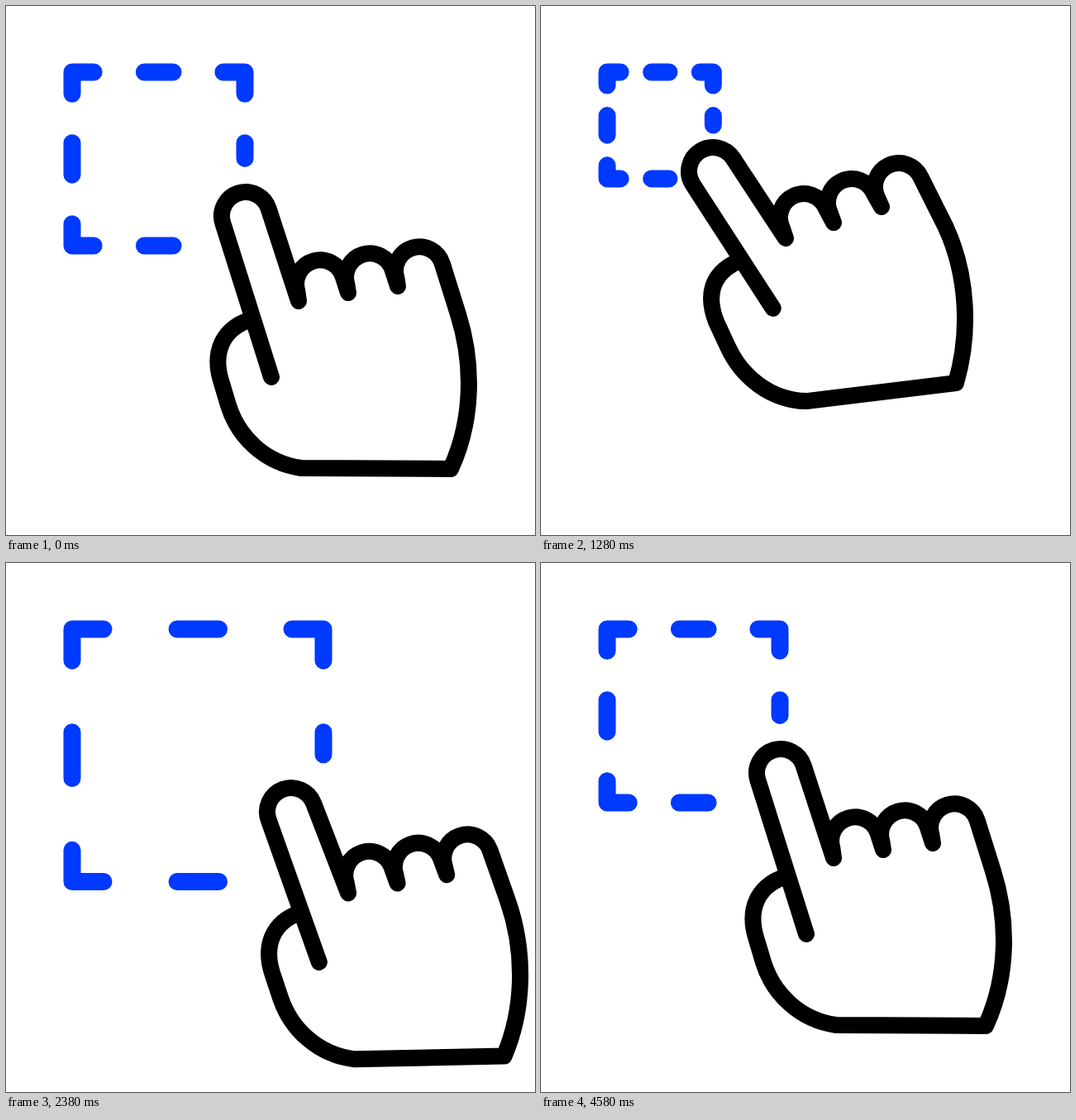
Write an HTML page that moves like this. It is 640 px wide and 640 px high and loops after 4680 ms.

```html
<!DOCTYPE html>
<html lang="en">
<head>
<meta charset="utf-8">
<title>Drag to resize</title>
<style>
  html, body { margin: 0; width: 100%; height: 100%; overflow: hidden; background: #fff; }
  svg { display: block; width: 100%; height: 100%; }
  path { fill: none; stroke-linecap: round; stroke-linejoin: round; }
  #box { stroke: #0039ff; stroke-width: 21; }
  #hand { stroke: #000; stroke-width: 20; }
</style>
</head>
<body>
<svg viewBox="0 0 640 640">
  <path id="box"/>
  <path id="hand"/>
</svg>
<script>
const LOOP = 4680, STEP = 100, LEAD = 20;
const RADIUS = 29;
const box = document.getElementById('box');
const hand = document.getElementById('hand');

// Points relative to the fingertip centre: upright pose, then tilted pose.
const POSE = {
  fingerEnd: [31, 195, 73, 166],
  gap1: [64, 103, 88, 81],
  gap2: [124, 93, 146, 62],
  gap3: [184, 85, 204, 43],
  middle: [90, 82, 110, 56],
  ring: [150, 74, 168, 38],
  little: [210, 66, 225, 19],
  side: [257, 119, 282, 68],
  side1: [276, 179, 308, 125],
  side2: [275, 248, 312, 195],
  wristR: [248, 306, 294, 256],
  wristL: [67, 305, 113, 278],
  heel1: [24, 299, 70, 277],
  heel2: [-9, 268, 35, 249],
  heel: [-21, 229, 18, 212],
  thumb: [-30, 199, 4, 182],
  thumb1: [-40, 166, -8, 151],
  thumb2: [-29, 136, -3, 124],
  thumbTop: [7, 125, 30, 109]
};

function ramp(t, from, to) {
  const u = Math.min(1, Math.max(0, (t - from) / (to - from)));
  return u * u * (3 - 2 * u);
}

const pt = (x, y) => x.toFixed(2) + ' ' + y.toFixed(2);

function drawBox(w) {
  const h = w * 1.005;
  const at = (u, v) => pt(80 + u * w, 80 + v * h);
  const line = (...p) => 'M' + p.map(([u, v]) => at(u, v)).join('L');
  const arm = 0.125, far = 1 - arm;
  box.setAttribute('d', [
    line([0, arm], [0, 0], [arm, 0]),
    line([far, 0], [1, 0], [1, arm]),
    line([0, far], [0, 1], [arm, 1]),
    line([0.418, 0], [0.584, 0]),
    line([0.418, 1], [0.584, 1]),
    line([0, 0.408], [0, 0.591]),
    line([1, 0.408], [1, 0.497])
  ].join(''));
}

function drawHand(x, y, tilt, shorten) {
  const at = (name) => {
    const [ax, ay, bx, by] = POSE[name];
    return [x + ax + (bx - ax) * tilt, y + ay + (by - ay) * tilt];
  };
  const p = (name) => pt(...at(name));
  const curve = (...names) => 'C' + names.map(p).join(' ');
  // Half circle over a finger end, leaning left by the given degrees.
  const cap = ([cx, cy], degrees) => {
    const a = degrees * Math.PI / 180;
    const dx = RADIUS * Math.cos(a), dy = RADIUS * Math.sin(a);
    return 'L' + pt(cx - dx, cy + dy) +
      `A${RADIUS} ${RADIUS} 0 0 1 ` + pt(cx + dx, cy - dy);
  };
  const lean = 17 + 8 * tilt;
  const [ex, ey] = at('fingerEnd');
  hand.setAttribute('d',
    'M' + pt(ex - 6 * shorten, ey - 7 * shorten) +
    cap([x, y], 17.5 + 15 * tilt) + 'L' + p('gap1') +
    cap(at('middle'), lean) + 'L' + p('gap2') +
    cap(at('ring'), lean) + 'L' + p('gap3') +
    cap(at('little'), lean) + 'L' + p('side') +
    curve('side1', 'side2', 'wristR') + 'L' + p('wristL') +
    curve('heel1', 'heel2', 'heel') + 'L' + p('thumb') +
    curve('thumb1', 'thumb2', 'thumbTop'));
}

function draw(k) {
  const shrink = ramp(k, 0, 8.9);
  const turn = ramp(k, 0, 9.6);
  const grow = ramp(k, 11.5, 23.2);
  const rest = ramp(k, 24.6, 44.3);
  const mix = (start, small, large, first = shrink) =>
    start + (small - start) * first + (large - small) * grow + (start - large) * rest;
  drawBox(mix(209, 120, 304));
  drawHand(mix(290, 201.5, 345), mix(254, 195.3, 301),
    mix(0, 1.037, 0.21, turn), grow - rest);
}

const begin = performance.now();
function tick() {
  const t = (performance.now() - begin) % LOOP;
  draw(Math.floor((t + LEAD) / STEP));
  requestAnimationFrame(tick);
}
tick();
</script>
</body>
</html>
```
